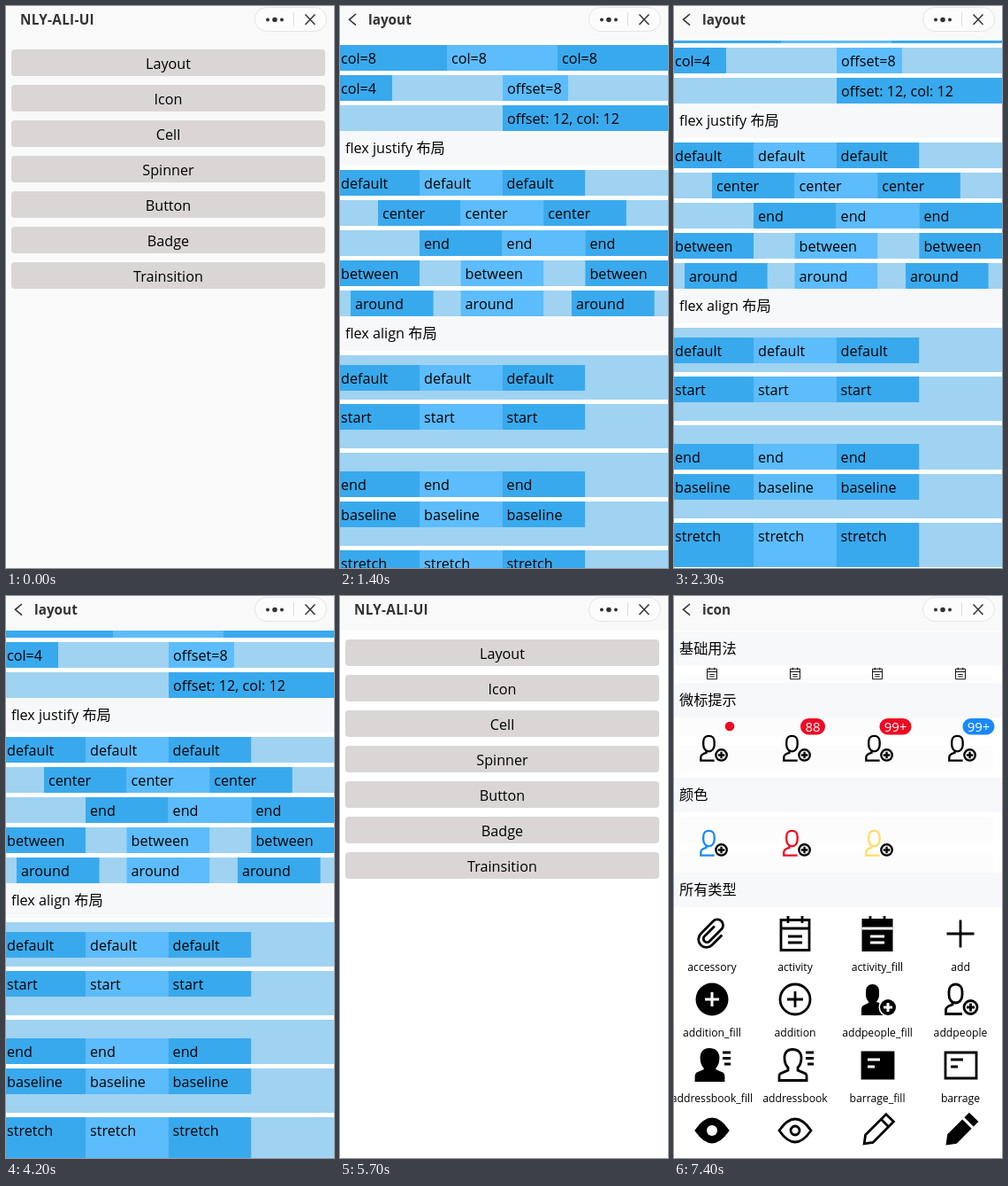
Write an HTML page that moves like this. It is 371 px wide and 634 px high and loops after 8000 ms.

```html
<!DOCTYPE html>
<html lang="zh">
<head>
<meta charset="utf-8">
<title>UI demo</title>
<style>
html, body { margin: 0; width: 100%; height: 100%; overflow: hidden; background: #f9f9f9; }
svg { display: block; width: 371px; height: 634px; }
text { font: 16.2px "Open Sans", "Noto Sans CJK SC", "Noto Sans CJK", "Noto Sans", sans-serif; fill: #000; }
.mid { text-anchor: middle; }
.label { font-size: 12.2px; text-anchor: middle; }
.badge { font-size: 15px; fill: #fff; text-anchor: middle; }
.title { font-size: 15.3px; font-weight: 700; fill: #333; }
.line { fill: none; stroke: currentColor; stroke-width: 2.8; }
.solid { fill: currentColor; }
.cut { fill: none; stroke: #fff; stroke-width: 3; }
</style>
</head>
<body>
<svg id="stage" viewBox="0 0 371 634"></svg>
<script>
const DARK = '#39a9ed', MID = '#5dbcfb', PALE = '#9fd3f1', RED = '#ee0a24', BLUE = '#1989fa';
const COLUMNS = [43, 137, 230, 324];

const rect = (x, y, w, h, fill, rx = 0) =>
  `<rect x="${x}" y="${y}" width="${w}" height="${h}" rx="${rx}" fill="${fill}"/>`;
const text = (x, y, s, cls = '') => `<text x="${x}" y="${y}" class="${cls}">${s}</text>`;
const path = (d, cls = 'line', more = '') => `<path d="${d}" class="${cls}" ${more}/>`;
const group = (id, body) => `<g id="${id}">${body}</g>`;
const heading = (y, s) => rect(0, y, 371, 39, '#f7f8fa') + text(6, y + 25, s);

// Home page
const MENU = ['Layout', 'Icon', 'Cell', 'Spinner', 'Button', 'Badge', 'Trainsition'];
const bars = fill => MENU.map((_, i) => rect(6, 49 + 40 * i, 355, 30, fill, 4)).join('');
const home = bars('#dad6d6') + MENU.map((s, i) => text(183.5, 71 + 40 * i, s, 'mid')).join('');

// Layout page: a cell is [left, right, text]
const row = (y, cells, h = 29, dy = 0, cellH = 29) => rect(0, y, 371, h, PALE) +
  cells.map(([a, b, s], i) => rect(a, y + dy, b - a, cellH, i % 2 ? MID : DARK) +
    text(a + 5, y + dy + 21, s)).join('');
const triple = (s, ...lefts) => lefts.map(a => [a, a === -4 ? 90 : a + 93.6, s]);
const tall = (y, s, dy, cellH) => row(y, triple(s, -4, 90, 183.6), 50, dy, cellH);

const layout =
  row(44, [[-4, 121, 'col=8'], [121, 246, 'col=8'], [246, 371, 'col=8']]) +
  row(78, [[-4, 59, 'col=4'], [184, 258, 'offset=8']]) +
  row(112, [[184, 371, 'offset: 12, col: 12']]) +
  heading(141, 'flex justify 布局') +
  row(185, triple('default', -4, 90, 183.6)) +
  row(219, triple('center', 43, 136.6, 230.2)) +
  row(253, triple('end', 90, 183.6, 277.4)) +
  row(287, triple('between', -4, 136.6, 277.4)) +
  row(321, triple('around', 12, 136.6, 262)) +
  heading(350, 'flex align 布局') +
  tall(394, 'default', 11) + tall(449, 'start') + tall(504, 'end', 21) +
  tall(559, 'baseline') + tall(614, 'stretch', 0, 50);

// Icons, each centred on 0,0 in a box of about 38
const tilt = 'transform="rotate(45)"';
const plus = r => `M${-r} 0H${r}M0 ${-r}V${r}`;
const disc = (r, cls) => `<circle r="${r}" class="${cls}"/>`;
const at = (x, y, body, scale = 1, color = '#000') =>
  `<g transform="translate(${x} ${y}) scale(${scale})" color="${color}">${body}</g>`;

const calendar = 'M-16 -15.5H16V18.5H-16Z', ticks = 'M-8 -20V-12M8 -20V-12';
const head = 'M-5.5 -17C-10 -17 -13 -14 -13 -9V-5C-13 0 -10 4 -5.5 4S2 0 2 -5V-9C2 -14 -1 -17 -5.5 -17Z';
const bust = 'M-3 -17.5C-9 -17.5 -12 -14 -12 -8C-12 -3 -10 1 -8 3V6L-17 10Q-18 11 -18 13V17.5H13V13Q13 11 12 10L3 6V3C5 1 7 -3 7 -8C7 -14 3 -17.5 -3 -17.5Z';
const board = 'M-17 -14H18V15H-17Z', notes = 'M-11 -6H3M-11 2H-3';
const lens = 'M-18 0Q-9 -13 0 -13T18 0Q9 13 0 13T-18 0Z';
const pen = 'M-6 -20H6V13L0 21L-6 13Z';
const sideLines = path('M12 -14H21M12 -7.5H21M14 -1H21');

const icons = {
  accessory: path('M9 -7V9A9 9 0 0 1 -9 9V-11A6.5 6.5 0 0 1 4 -11V8A4 4 0 0 1 -4 8V-8', 'line', tilt),
  activity: path(calendar + ticks + 'M-16 -6H16M-8 3H8M-8 10H8'),
  activity_fill: path('M-17.5 -17H17.5V20H-17.5Z', 'solid') + path(ticks) +
    path('M-17.5 -6H17.5M-8 3H8M-8 10H8', 'cut'),
  add: path(plus(15.5)),
  addition_fill: disc(18.5, 'solid') + path(plus(8), 'cut'),
  addition: disc(17, 'line') + path(plus(9)),
  addpeople_fill: path(head, 'solid') +
    path('M-10 0V4L-16 7Q-18 8 -18 11V18H8V6L-1 3V0Z', 'solid') +
    at(12, 9, '<circle r="10.5" fill="#fff"/>' + disc(9, 'solid') + path(plus(5), 'cut')),
  addpeople: path(head) + path('M2 16.5H-16.5V12Q-16.5 8 -9 6V2') +
    at(11.5, 9, disc(7.5, 'line') + path(plus(4.5))),
  addressbook_fill: path(bust, 'solid') + path(bust) + sideLines,
  addressbook: path(bust) + sideLines,
  barrage_fill: path(board, 'solid') + path(board) + path(notes, 'cut'),
  barrage: path(board) + path(notes),
  browse_fill: path(lens, 'solid') + path(lens) + '<circle r="6" fill="#fff"/>',
  browse: path(lens) + disc(5, 'line'),
  brush: path(pen + 'M-6 -12H6', 'line', tilt),
  brush_fill: path(pen, 'solid', tilt) + path(pen, 'line', tilt) + path('M-8 -12H8', 'cut', tilt)
};

const pill = (x, w, color, s) => rect(x, 138, w, 18.5, color, 9.25) + text(x + w / 2, 152.5, s, 'badge');
const people = (y, colors) => colors.map((c, i) => at(COLUMNS[i] + 1, y, icons.addpeople, 0.83, c)).join('');
const grid = Object.entries(icons).map(([name, body], i) => {
  const x = COLUMNS[i % 4], y = 381 + 74 * (i >> 2);
  return at(x, y, body) + text(x, y + 42, name, 'label');
}).join('');

const iconPage =
  heading(40, '基础用法') + rect(0, 78, 371, 1, '#fff') +
  COLUMNS.map(x => at(x, 87.5, icons.activity, 0.34)).join('') +
  heading(98, '微标提示') + people(172, Array(4).fill('#000')) +
  `<circle cx="63" cy="147" r="5.3" fill="${RED}"/>` +
  pill(143, 28, RED, '88') + pill(232.5, 36, RED, '99+') + pill(326.5, 36, BLUE, '99+') +
  heading(205, '颜色') + people(279, [BLUE, RED, '#ffdd66']) +
  heading(312, '所有类型') + grid;

// Title bar
const bar = rect(0, 0, 371, 39, '#f9f9f9') +
  '<path id="back" d="M18 9L10.5 15.3L18 21.6" fill="none" stroke="#333" stroke-width="1.6"/>' +
  '<text id="title" y="20.8" class="title"></text>' +
  '<rect x="281.5" y="1.5" width="81" height="27" rx="13.5" fill="#fcfcfc" stroke="#e4e4e4"/>' +
  [[296, 2], [304, 2.8], [312, 2]].map(([x, r]) => `<circle cx="${x}" cy="15.5" r="${r}" fill="#333"/>`).join('') +
  '<path d="M325.5 7V23" stroke="#ddd"/>' +
  '<path d="M338.5 9.5L349.5 21M349.5 9.5L338.5 21" stroke="#333" stroke-width="1.5"/>';

document.getElementById('stage').innerHTML =
  '<rect id="paper" width="371" height="634"/>' + group('traces', bars('currentColor')) +
  group('home', home) + group('layout', layout) + group('icon', iconPage) + bar;

// Each step: start, title, shown page, paper, scroll, opacity
const STEPS = [
  [0, 'NLY-ALI-UI', 'home', '#f9f9f9'],
  [1000, 'layout', '', '#f9f9f9'],
  [1300, 'layout', 'layout', '#fff', 0, 0.6],
  [1400, 'layout', 'layout', '#fff'],
  [2200, 'layout', 'layout', '#fff', 20],
  [2300, 'layout', 'layout', '#fff', 31],
  [4200, 'layout', 'layout', '#fff', 26],
  [4300, 'layout', 'layout', '#fff'],
  [5700, 'NLY-ALI-UI', 'home', '#fff'],
  [6600, 'icon', '', '#fff'],
  ...[0.4, 0.6, 0.75, 0.87, 0.95, 1].map((o, i) => [6900 + 100 * i, 'icon', 'icon', '#fff', 0, o])
];
const LOOP = 8000;
const el = id => document.getElementById(id);
const start = performance.now();
let current = null;

function show([, title, page, paper, scroll = 0, opacity = 1]) {
  const isHome = page === 'home';
  for (const id of ['home', 'layout', 'icon']) el(id).style.display = id === page ? '' : 'none';
  if (page) {
    el(page).style.opacity = opacity;
    el(page).setAttribute('transform', `translate(0 ${-scroll})`);
  }
  el('paper').setAttribute('fill', paper);
  el('traces').style.color = title === 'icon' ? '#fcfcfc' : '#fff';
  el('back').style.display = isHome ? 'none' : '';
  el('title').textContent = title;
  el('title').setAttribute('x', isHome ? 16 : 32);
  el('title').style.letterSpacing = isHome ? '0.3px' : '0';
}

function tick() {
  const t = Math.max(0, performance.now() - start) % LOOP;
  const step = STEPS.findLast(s => s[0] <= t);
  if (step !== current) show(current = step);
  requestAnimationFrame(tick);
}
tick();
</script>
</body>
</html>
```
